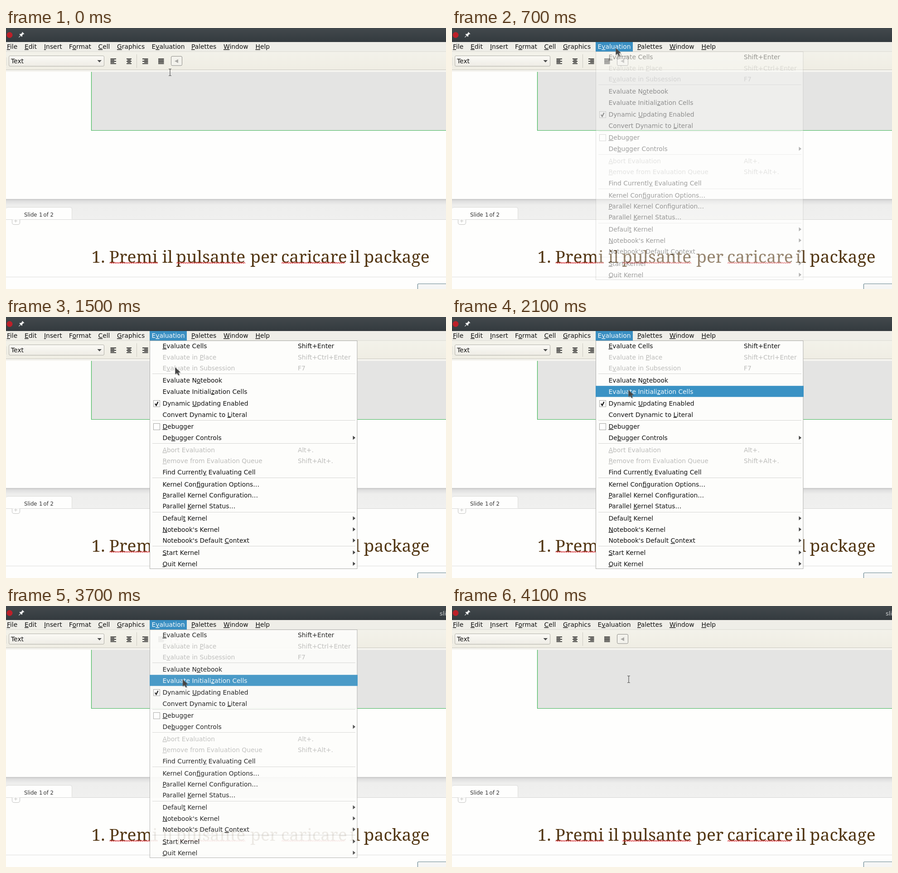
Animation, 971 px wide and 577 px high, one loop 4150 ms. Source, as an HTML page:

```html
<!DOCTYPE html>
<html lang="it">
<head>
<meta charset="utf-8">
<title>Evaluation menu</title>
<style>
  html, body { margin: 0; width: 100%; height: 100%; overflow: hidden; background: #fefefd; }
  svg { display: block; position: absolute; left: 0; top: 0; }
  text { font: 13.87px "DejaVu Sans", sans-serif; fill: #111; white-space: pre; }
  .u { text-decoration: underline; text-decoration-thickness: 1px; text-underline-offset: 1.5px; }
  .off { fill: #bcbcba; }
  .lit { fill: #f4f9fc; }
  .small { font-size: 11.7px; fill: #333; }
  .title { font: 37.3px "Noto Serif", serif; fill: #533714; }
</style>
</head>
<body>
<svg width="971" height="577" viewBox="0 0 971 577">
  <defs>
    <linearGradient id="bar" x2="0" y2="1"><stop stop-color="#42494d"/><stop offset="1" stop-color="#343a3e"/></linearGradient>
    <linearGradient id="tools" x2="0" y2="1"><stop stop-color="#f3f2ea"/><stop offset="1" stop-color="#efede3"/></linearGradient>
    <linearGradient id="combo" x2="0" y2="1"><stop stop-color="#fbfaf6"/><stop offset="1" stop-color="#eeece5"/></linearGradient>
    <linearGradient id="gap" x2="0" y2="1"><stop stop-color="#c6c6c6"/><stop offset=".09" stop-color="#dedede"/><stop offset=".3" stop-color="#eeeeed"/><stop offset="1" stop-color="#f0f0ef"/></linearGradient>
  </defs>

  <rect width="971" height="577" fill="#fefefd"/>
  <rect x="188" y="94" width="790" height="133" fill="#e4e4e3"/>
  <path d="M188.500 96V226.500H971" fill="none" stroke="#3fb556" stroke-width="1.2"/>

  <rect y="378" width="971" height="45" fill="url(#gap)"/>
  <path d="M0 423.500H971" stroke="#d6d6d4"/>
  <path d="M0 423V400Q0 397 3 397H142Q145 397 145 400V423Z" fill="#fefefd"/>
  <path d="M1 398.500Q2 396.500 4 396.500H142Q145.500 396.500 145.500 400V422" fill="none" stroke="#dcdcda"/>
  <path d="M13.500 423.500V430Q13.500 434.500 18 434.500H26Q30.500 434.500 30.500 430V423.500" fill="#fefefd" stroke="#c4c4c2"/>
  <path d="M18 426.500H25M21.500 423.500V430" stroke="#c2c2c0"/>
  <path d="M0 550.500H971" stroke="#dededc"/>
  <path d="M908.500 580V567.500Q908.500 565.500 910.500 565.500H975V580Z" fill="#f5f6f5" stroke="#66858f" stroke-width="1.2"/>
  <g id="page"></g>

  <rect y="52" width="971" height="42" fill="url(#tools)"/>
  <rect y="30" width="971" height="22" fill="#efeee8"/>
  <path d="M0 52H971" stroke="#dad8d0"/>
  <path d="M0 92.500H971" stroke="#c9c7bf"/>
  <rect y="93" width="971" height="4" fill="#f6f5f0"/>
  <rect width="971" height="31" fill="url(#bar)"/>
  <circle cx="8" cy="15.500" r="6.500" fill="#bd2029"/>
  <g transform="translate(34 15) rotate(45)" fill="#f4f4f4">
    <path d="M-3 -6H3V-4.500H2V-1L4 1.500V2.500H-4V1.500L-2 -1V-4.500H-3Z"/>
    <path d="M-.6 2H.6V8H-.6Z"/>
  </g>
  <text id="name" x="957" y="20.500" style="font-size:13px;fill:#d0d3d4">slide</text>

  <path d="M1.500 66V82" stroke="#bdbbb3" stroke-dasharray="1 2"/>
  <rect x="6.500" y="61.500" width="210" height="23" rx="2.500" fill="url(#combo)" stroke="#b2b0a9"/>
  <path d="M201.500 71H211L206.250 76Z" fill="#4c4c4c"/>
  <text x="11" y="78">Text</text>
  <path id="lines" stroke="#1d1d1d" stroke-width="1.600"/>
  <path d="M288.500 58V88" stroke="#cbc9c1"/>
  <rect x="364.500" y="62.500" width="24" height="20.500" rx="2.500" fill="#f3f2ec" stroke="#8d8c88"/>
  <path d="M380 69V77.500L372 73.250Z" fill="#aaa9a5"/>

  <rect id="open" x="317" y="31" width="82" height="21" fill="#3a8fc2"/>
  <g id="bar-items"></g>

  <g id="menu">
    <rect x="317.500" y="52.500" width="457.500" height="504" fill="#fdfdfb" stroke="#adadab"/>
    <path id="rules" stroke="#d5d5d3"/>
    <rect id="hover" x="317" width="459" height="24.500" fill="#3a92c4"/>
    <g fill="#fefefe" stroke="#a6a6a4">
      <rect x="325.500" y="184.500" width="14" height="14"/>
      <rect x="325.500" y="235.500" width="14" height="14"/>
    </g>
    <path d="M329 191.500L331.500 195.500L335.500 187.500" fill="none" stroke="#111" stroke-width="2.200"/>
    <path id="subs" fill="#444"/>
    <g id="rows"></g>
  </g>

  <g id="arrow">
    <path d="M1 1.500V17L5 13.500L8 19L10 18L8 12.500H12.500Z" fill="#000" opacity=".16" transform="translate(1 1)"/>
    <path d="M.5 .5V15.500L4.500 12.500L7 18L9.300 17L7.300 11.800L11.500 11Z" fill="#454545" stroke="#777" stroke-width=".7"/>
  </g>
  <path id="beam" d="M-3 -7.500H-1L0 -6.500L1 -7.500H3M0 -6.500V6.500M-3 7.500H-1L0 6.500L1 7.500H3" fill="none" stroke="#555" stroke-width="1.200"/>
</svg>

<script>
const LOOP = 4150, STEP = 50;
const $ = id => document.getElementById(id);

// "&" marks the underlined shortcut letter
function label(parent, s, x, y, cls = "") {
  const t = document.createElementNS("http://www.w3.org/2000/svg", "text");
  t.setAttribute("x", x);
  t.setAttribute("y", y);
  t.setAttribute("class", cls);
  t.innerHTML = s.replace(/&(.)/, '<tspan class="u">$1</tspan>');
  $(parent).append(t);
  return t;
}

const bar = [["&File", 2], ["&Edit", 41], ["&Insert", 84], ["F&ormat", 139], ["&Cell", 203.5],
  ["&Graphics", 245], ["E&valuation", 321.5], ["&Palettes", 409], ["&Window", 480], ["&Help", 550.5]];
const barText = bar.map(([s, x]) => label("bar-items", s, x, 46));

// label, centre, shortcut, flags: d disabled, s submenu
const rows = [
  ["&Evaluate Cells", 64, "Shift+Enter"],
  ["Evaluate in &Place", 88.5, "Shift+Ctrl+Enter", "d"],
  ["E&valuate in Subsession", 113, "F7", "d"],
  ["Evaluate N&otebook", 140],
  ["Evaluate Initiali&zation Cells", 164.5],
  ["Dynamic &Updating Enabled", 191],
  ["Convert Dynamic to &Literal", 215.5],
  ["&Debugger", 242],
  ["De&bugger Controls", 267, "", "s"],
  ["&Abort Evaluation", 293.5, "Alt+.", "d"],
  ["&Remove from Evaluation Queue", 318, "Shift+Alt+.", "d"],
  ["Find Currentl&y Evaluating Cell", 342.5],
  ["Kernel Con&figuration Options…", 369.5],
  ["&Parallel Kernel Configuration…", 394],
  ["Parallel &Kernel Status…", 418],
  ["Defaul&t Kernel", 445, "", "s"],
  ["&Notebook's Kernel", 469.5, "", "s"],
  ["Notebook's Default &Context", 494, "", "s"],
  ["&Start Kernel", 520.5, "", "s"],
  ["&Quit Kernel", 545.5, "", "s"]
];
let subs = "";
const rowText = rows.map(([s, y, keys, flag]) => {
  const cls = flag === "d" ? "off" : "";
  if (keys) label("rows", keys, 644, y + 5, cls);
  if (flag === "s") subs += `M765.5 ${y - 4.5}V${y + 4.5}L771 ${y}Z`;
  return label("rows", s, 345.5, y + 5, cls);
});
$("subs").setAttribute("d", subs);
$("rules").setAttribute("d", [125.5, 228.5, 279.5, 355.5, 431.5, 506.5].map(y => `M323 ${y}H771`).join(""));

// paragraph alignment icons: left edge, long and short line widths, where short lines sit
const icons = [[230.5, 12.5, 8.5, 0], [266, 11, 7, .5], [301, 12.5, 8.5, 1], [336, 12.5, 12.5, 0]];
$("lines").setAttribute("d", icons.map(([x, long, short, side]) =>
  [0, 1, 2, 3, 4].map(i => {
    const w = i % 2 ? short : long;
    return `M${x + (long - w) * side} ${68.4 + i * 2.6}h${w}`;
  }).join("")).join(""));

[["Slide", 40], ["1", 73], ["of", 82.5], ["2", 97.5]].forEach(([s, x]) => label("page", s, x, 416.5, "small"));
[["1.", 188.5], ["Premi", 227.5], ["il", 344.5], ["pulsante", 375], ["per", 539],
  ["caricare", 607], ["il", 758], ["package", 789.5]].forEach(([s, x]) => label("page", s, x, 518.5, "title"));

let wave = "";
for (const [a, b] of [[229, 335], [376, 529], [608, 749]]) {
  wave += `M${a} 520.5`;
  for (let x = a + 2, up = 1; x <= b; x += 2, up = !up) wave += `L${x} ${up ? 517.8 : 520.5}`;
}
$("page").insertAdjacentHTML("beforeend", `<path d="${wave}" fill="none" stroke="#d8343a" stroke-width="1.1"/>`);

const path = [[0, 362, 98], [550, 361, 44], [850, 361, 44], [950, 369, 85], [1450, 369, 85], [1500, 373, 111],
  [1550, 373, 111], [1650, 377, 123], [1750, 377, 123], [2100, 389, 161], [3000, 389, 161], [3100, 389, 162], [LOOP, 390, 162]];
const fade = [[0, 0], [650, 0], [700, .4], [750, .68], [800, .87], [900, 1], [3650, 1], [3700, .9],
  [3750, .6], [3800, .3], [3850, .1], [3900, 0], [LOOP, 0]];

function at(table, t) {
  const i = table.findIndex(k => k[0] > t);
  const [a, b] = [table[i - 1], table[i]];
  const p = (t - a[0]) / (b[0] - a[0]);
  return a.slice(1).map((v, j) => v + (b[j + 1] - v) * p);
}

const show = (id, on) => $(id).style.display = on ? "" : "none";

function draw(now) {
  const t = Math.floor(now % LOOP / STEP) * STEP;
  const [x, y] = at(path, t), [alpha] = at(fade, t);
  const open = t >= 700 && t < 3750;
  const beam = y >= 95 && (t < 700 || t >= 3800);

  $("menu").style.opacity = alpha;
  show("menu", alpha > 0);
  show("open", open);
  barText[6].setAttribute("class", open ? "lit" : "");
  show("name", t >= 3700);

  const pick = t < 1000 ? -1 : y >= 152 ? 4 : y >= 128 ? 3 : -1;
  show("hover", pick > 0);
  if (pick > 0) $("hover").setAttribute("y", rows[pick][1] - 12.3);
  [3, 4].forEach(i => rowText[i].setAttribute("class", i === pick ? "lit" : ""));

  show("beam", beam);
  show("arrow", !beam);
  $(beam ? "beam" : "arrow").setAttribute("transform", `translate(${x} ${y})`);
}

const start = performance.now();
function tick() {
  draw(performance.now() - start);
  requestAnimationFrame(tick);
}
draw(0);
requestAnimationFrame(tick);
</script>
</body>
</html>
```
